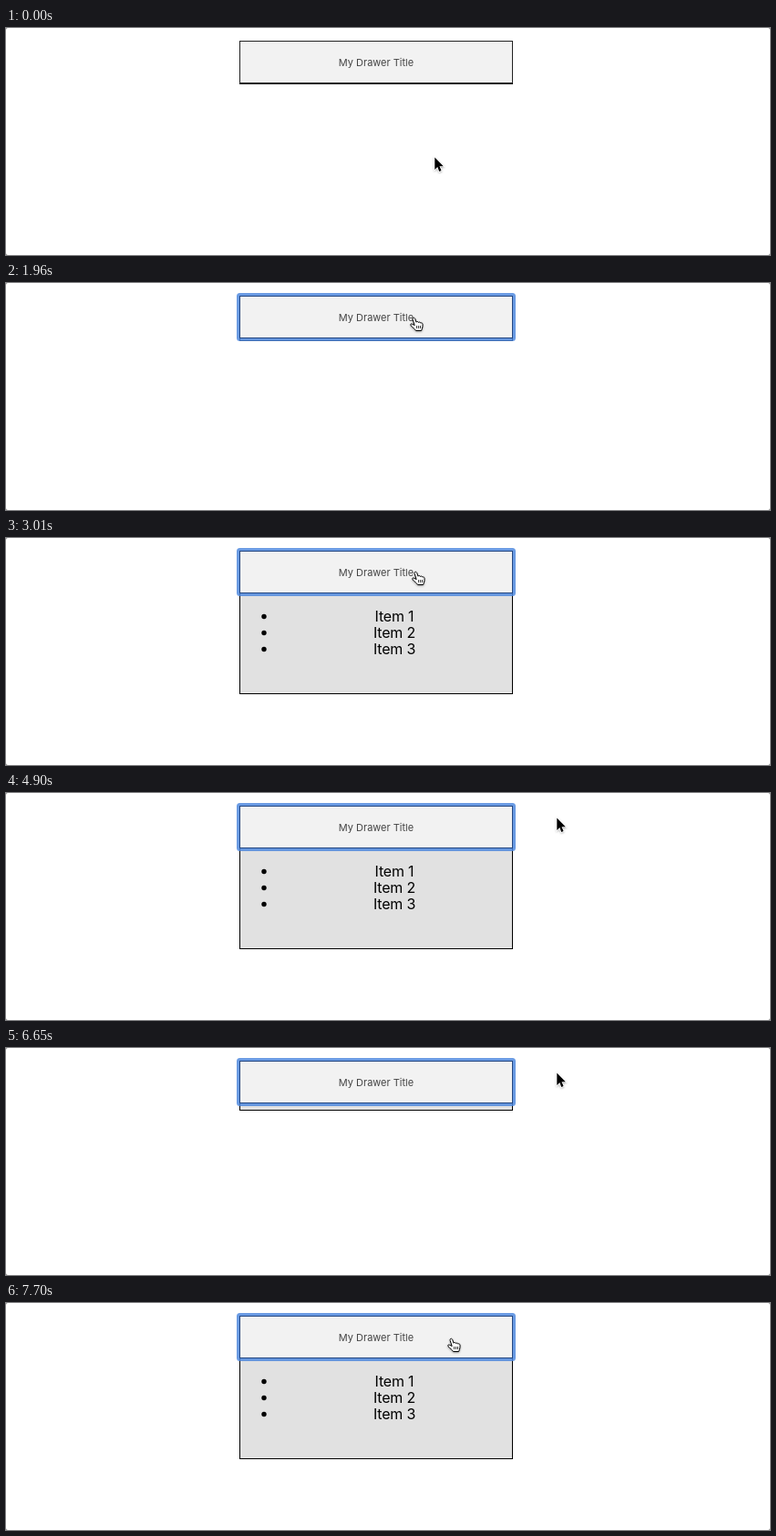
These frames come from a looping animation (838x250 px, 8 s). An HTML page:

```html
<!DOCTYPE html>
<html lang="en">
<head>
<meta charset="utf-8">
<title>Drawer</title>
<style>
html, body { margin: 0; width: 100%; height: 100%; overflow: hidden; background: #777; }
body { background: #fff; border-radius: 2px; }
html { background: #777; }
svg { display: block; }
text { font-family: Inter, "Open Sans", sans-serif; text-anchor: middle; }
.title { font-size: 11px; fill: #444; }
.items { font-size: 16px; letter-spacing: -.2px; }
</style>
</head>
<body>
<svg width="838" height="250" viewBox="0 0 838 250">
  <defs>
    <clipPath id="clip"><rect id="window" x="257" y="61" width="298" height="0"/></clipPath>
    <filter id="soft" x="-5%" y="-20%" width="110%" height="140%"><feGaussianBlur stdDeviation=".65"/></filter>
    <filter id="shade" x="-50%" y="-50%" width="200%" height="200%">
      <feDropShadow dx="0" dy="1" stdDeviation=".8" flood-opacity=".35"/>
    </filter>
  </defs>

  <rect id="drawer" x="256.5" y="60.5" width="299" height="1" fill="#e1e1e1" stroke="#000"/>
  <g id="items" class="items" clip-path="url(#clip)"></g>

  <rect x="256.5" y="14.5" width="299" height="46" fill="#f2f2f2" stroke="#222"/>
  <text class="title" x="406" y="42">My Drawer Title</text>

  <g id="ring" fill="none">
    <rect x="254.5" y="12.5" width="303" height="50" rx="2" stroke="#4a86de" stroke-width="3" opacity=".82" filter="url(#soft)"/>
    <rect x="256.5" y="14.5" width="299" height="46" stroke="#234680"/>
  </g>

  <g id="arrow" filter="url(#shade)">
    <path d="M.3 .5V14L3.3 11.1L5.2 15.9L7.5 15L5.5 10.2H9.8Z" stroke="#fff" stroke-width="1.3" paint-order="stroke"/>
  </g>
  <g id="hand" filter="url(#shade)">
    <g transform="translate(-4 -1)" fill="#fff" stroke="#000" stroke-linejoin="round">
      <path d="M5.2 9.6L3.2 3.4C2.5 1.2 4.9 .4 5.7 2.4L7 6.2C7.5 5.1 9.1 5.2 9.4 6.5C10 5.7 11.4 5.9 11.7 7.1C12.6 6.5 13.9 7 14 8.3C14.2 11 13.6 13 12.6 15.5H6.6C5.6 13.6 3 12 1 9.8C0 8.4 1.6 7.4 2.8 8.3Z"/>
      <path d="M7.6 10V13M9.6 10V13M11.5 10V13" stroke-width=".8"/>
    </g>
  </g>
</svg>
<script>
const LOOP = 8000, STEP = 70, SLIDE = 540, OPEN = 110;
const el = id => document.getElementById(id);

// Pointer hotspot: time, x, y
const path = [
  [0, 470, 142], [350, 458, 49], [420, 458, 49], [560, 458, 89], [700, 458, 89],
  [1120, 447, 38], [2940, 447, 38], [3010, 449, 37], [3220, 677, 39],
  [4130, 677, 39], [4550, 604, 27], [7280, 604, 27], [7700, 488, 39]
];

el("items").innerHTML = [1, 2, 3].map(n => {
  const y = 68 + 18 * n;
  return `<circle cx="283" cy="${y + .5}" r="2.7"/><text x="426" y="${y + 6}">Item ${n}</text>`;
}).join("");

const clamp = v => Math.min(1, Math.max(0, v));
const smooth = p => p * p * (3 - 2 * p);

// CSS "ease": cubic-bezier(.25, .1, .25, 1)
function ease(p) {
  let lo = 0, hi = 1, s = .5;
  for (let i = 0; i < 20; i++) {
    s = (lo + hi) / 2;
    const x = .75 * s * (1 - s) * (1 - s) + .75 * s * s * (1 - s) + s ** 3;
    if (x < p) lo = s; else hi = s;
  }
  return .3 * s * (1 - s) * (1 - s) + 3 * s * s * (1 - s) + s ** 3;
}

const slide = (t, start) => ease(clamp((t - start) / SLIDE));

function pointer(t) {
  const i = path.findIndex(k => k[0] > t);
  if (i < 0) return path[path.length - 1].slice(1);
  const [t0, x0, y0] = path[i - 1], [t1, x1, y1] = path[i];
  const p = smooth((t - t0) / (t1 - t0));
  return [Math.round(x0 + (x1 - x0) * p), Math.round(y0 + (y1 - y0) * p)];
}

function draw(t) {
  const h = Math.round(OPEN * (slide(t, 1944) - slide(t, 5590) + slide(t, 6609)));
  el("drawer").setAttribute("height", h + 1);
  el("window").setAttribute("height", h);

  const focused = t >= 1190 && t < 3500 || t >= 4900;
  el("ring").style.display = focused ? "" : "none";

  const [x, y] = pointer(t);
  const over = t > 600 && x > 256 && x < 556 && y > 14 && y < 61;
  for (const id of ["arrow", "hand"]) {
    el(id).setAttribute("transform", `translate(${x} ${y})`);
    el(id).style.display = (id === "hand") === over ? "" : "none";
  }
}

const begin = performance.now();
function tick() {
  const t = (performance.now() - begin) % LOOP;
  draw(Math.floor(t / STEP) * STEP);
  requestAnimationFrame(tick);
}
tick();
</script>
</body>
</html>
```
